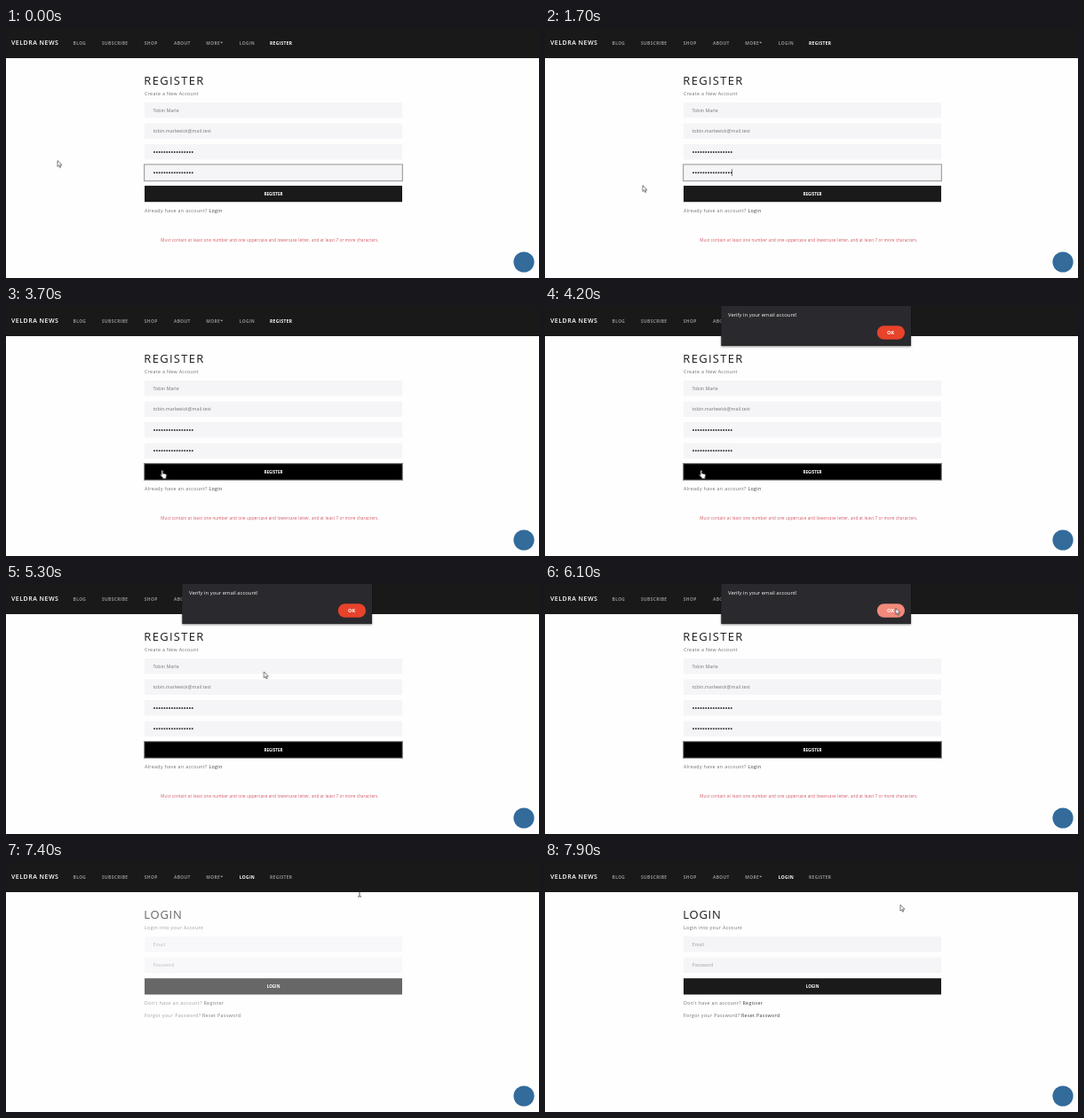
Animation, 600 px wide and 282 px high, one loop 8 s. Source, as an HTML page:

```html
<!DOCTYPE html>
<html lang="en">
<head>
<meta charset="utf-8">
<title>Register and log in</title>
<style>
  html, body { margin: 0; width: 100%; height: 100%; overflow: hidden; background: #fefefe; }
  svg { display: block; width: 100vw; height: 100vh; }
  text { font-family: "Open Sans", "Noto Sans", sans-serif; white-space: pre; }

  .brand { font-size: 7px; font-weight: 600; letter-spacing: .5px; fill: #fff; }
  .nav text { font-size: 4.9px; font-weight: 700; letter-spacing: .34px; fill: #8f8f91; }
  .nav .current { fill: #fff; }
  .title { font-size: 13px; fill: #1b1b1b; }
  .note { font-size: 5.3px; letter-spacing: .34px; fill: #707070; }
  .note tspan { fill: #3a3a3a; }
  .value { font-size: 5.3px; fill: #77777a; }
  .hint { font-size: 5.3px; fill: #a0a0a4; }
  .label { font-size: 4.6px; font-weight: 700; fill: #fff; text-anchor: middle; }
  .error { font-size: 4.4px; letter-spacing: .21px; fill: #d2505c; }
  .field { fill: #f5f5f7; }
  .button { fill: #1a1a1a; }
  .dots { stroke: #333; stroke-width: 2; stroke-linecap: round; stroke-dasharray: 0 2.85; }
  .ring { fill: none; stroke: #a3a3a6; stroke-width: 1.2; }
  .message { font-size: 5.9px; fill: #f4f4f4; }
  .ok { font-size: 5.6px; }

  /* One shared 8 s clock: 1% is 80 ms. */
  [class*="t-"] { animation: 8s step-end infinite; }
  .t-before { animation-name: before; }
  .t-after { animation-name: after; }
  .t-field-focus { animation-name: field-focus; }
  .t-button-focus { animation-name: button-focus; }
  .t-caret { animation-name: caret; }
  .t-dialog { animation-name: dialog; }
  .t-ok { animation-name: ok; }
  .t-login { animation-name: login; animation-timing-function: linear; }
  .t-pointer { animation-name: pointer; }
  .t-arrow { animation-name: arrow; }
  .t-hand { animation-name: hand; }
  .t-beam { animation-name: beam; }

  @keyframes before { 0% { opacity: 1 } 85%, 100% { opacity: 0 } }
  @keyframes after { 0% { opacity: 0 } 85%, 100% { opacity: 1 } }
  @keyframes field-focus { 0% { opacity: 1 } 46.25%, 100% { opacity: 0 } }
  @keyframes button-focus { 0% { opacity: 0 } 46.25%, 100% { opacity: 1 } }
  @keyframes caret {
    0%, 13.75%, 27.5%, 41.25%, 100% { opacity: 0 }
    7.5%, 21.25%, 33.75% { opacity: 1 }
  }
  @keyframes dialog { 0%, 88.75%, 100% { opacity: 0 } 50% { opacity: 1 } }
  @keyframes ok {
    0% { fill: #e8432b }
    70% { fill: #e9604d }
    75% { fill: #f28a7b }
    85%, 100% { fill: #e2523e }
  }
  @keyframes login { 0%, 87.35% { opacity: 0 } 95.1%, 100% { opacity: 1 } }
  @keyframes pointer {
    0% { transform: translate(58px, 149.5px) }
    7.5% { transform: translate(110px, 177.5px) }
    32.5% { transform: translate(110px, 177.5px); animation-timing-function: steps(4) }
    37.5% { transform: translate(160.5px, 181.5px); animation-timing-function: steps(3) }
    41.25% { transform: translate(173.3px, 185px) }
    60% { transform: translate(173.3px, 185px); animation-timing-function: steps(9) }
    71.25% { transform: translate(384px, 30px); animation-timing-function: steps(5) }
    76.25% { transform: translate(394.8px, 27.3px) }
    86.25% { transform: translate(400px, 32.5px) }
    88.75% { transform: translate(398px, 35px) }
    95% { transform: translate(399px, 43px); animation-timing-function: steps(3) }
    98.75%, 100% { transform: translate(400px, 48.2px) }
  }
  @keyframes arrow { 0%, 61.25%, 95%, 100% { opacity: 1 } 37.5%, 86.25% { opacity: 0 } }
  @keyframes hand { 0%, 61.25%, 100% { opacity: 0 } 37.5% { opacity: 1 } }
  @keyframes beam { 0%, 95%, 100% { opacity: 0 } 86.25% { opacity: 1 } }
</style>
</head>
<body>
<svg viewBox="0 0 600 282" preserveAspectRatio="none">
  <defs>
    <rect id="field" class="field" x="156" width="290" height="17.5" rx="1"/>
    <rect id="button" class="button" x="156" width="290" height="18.3"/>
    <path id="dots" class="dots" d="M167 0h43"/>
    <filter id="shadow" x="-10%" y="-20%" width="120%" height="150%">
      <feDropShadow dx="0" dy="1" stdDeviation="1.2" flood-opacity=".45"/>
    </filter>
  </defs>

  <rect width="600" height="282" fill="#fefefe"/>

  <rect width="600" height="34" fill="#19191a"/>
  <text class="brand" x="6" y="19.2">VELDRA NEWS</text>
  <g class="nav">
    <text x="75.5" y="18.8">BLOG</text>
    <text x="108" y="18.8">SUBSCRIBE</text>
    <text x="155.8" y="18.8">SHOP</text>
    <text x="189" y="18.8">ABOUT</text>
    <text x="225.3" y="18.8">MORE</text>
    <path d="M241.3 15.8h3l-1.5 1.6z" fill="#a5a5a7"/>
    <g class="t-before">
      <text x="262.8" y="18.8">LOGIN</text>
      <text class="current" x="297" y="18.8">REGISTER</text>
    </g>
    <g class="t-after">
      <text class="current" x="262.8" y="18.8">LOGIN</text>
      <text x="297" y="18.8">REGISTER</text>
    </g>
  </g>

  <g class="t-before">
    <text class="title" x="155.3" y="64.3" letter-spacing="1.3">REGISTER</text>
    <text class="note" x="156" y="75.9">Create a New Account</text>
    <use href="#field" y="84"/>
    <use href="#field" y="107.5"/>
    <use href="#field" y="131"/>
    <use href="#field" y="154.5"/>
    <text class="value" x="165.5" y="94.8">Tobin Marle</text>
    <text class="value" x="165.5" y="118.2">tobin.marlewick@mail.test</text>
    <use href="#dots" y="140"/>
    <use href="#dots" y="163.3"/>
    <g class="t-field-focus">
      <rect class="ring" x="155.6" y="153.9" width="290.8" height="18.6"/>
      <path class="t-caret" d="M210.5 159v8" stroke="#333" stroke-width=".6"/>
    </g>
    <use href="#button" y="177.9"/>
    <g class="t-button-focus">
      <rect x="155.6" y="177.6" width="290.8" height="18.8" stroke="#8a8a8c" stroke-width="1.2"/>
    </g>
    <text class="label" x="301" y="188.8">REGISTER</text>
    <text class="note" x="156" y="207.9">Already have an account? <tspan>Login</tspan></text>
    <text class="error" x="174.3" y="240.6">Must contain at least one number and one uppercase and lowercase letter, and at least 7 or more characters.</text>
  </g>

  <g class="t-login">
    <text class="title" x="155.3" y="64.3" letter-spacing=".75">LOGIN</text>
    <text class="note" x="156" y="75.9">Login into your Account</text>
    <use href="#field" y="84"/>
    <use href="#field" y="107.5"/>
    <text class="hint" x="165.5" y="94.8">Email</text>
    <text class="hint" x="165.5" y="118.2">Password</text>
    <use href="#button" y="131.2"/>
    <text class="label" x="301" y="142">LOGIN</text>
    <text class="note" x="156" y="161.2">Don't have an account? <tspan>Register</tspan></text>
    <text class="note" x="156" y="175.4">Forgot your Password? <tspan>Reset Password</tspan></text>
  </g>

  <circle cx="583" cy="264" r="11.6" fill="#336b9b"/>

  <g class="t-dialog">
    <rect x="198.3" y="-6" width="213.7" height="51" fill="#292a2d" filter="url(#shadow)"/>
    <text class="message" x="206" y="12">Verify in your email account!</text>
    <rect class="t-ok" x="373.8" y="22.2" width="31.2" height="15.6" rx="7.8"/>
    <text class="label ok" x="389.2" y="32">OK</text>
  </g>

  <g class="t-pointer">
    <path class="t-arrow" d="M0 0v7l1.6-1.4 1.1 2.4 1-.4-1.1-2.4H5z"
          fill="#fff" stroke="#222" stroke-width=".6" stroke-linejoin="round"/>
    <path class="t-hand" d="M1.8 1a.8.8 0 0 1 1.6 0v3l3 .6q1.1.3 1 1.4L6.9 8v1.8H3.1V8.600L.5 6q-.3-.9.5-.9l.8.700z"
          fill="#fff" stroke="#222" stroke-width=".5" stroke-linejoin="round"/>
    <path class="t-beam" d="M-2-4H-.6L0-3.500.6-4H2M0-3.500V3.500M-2 4H-.6L0 3.500.6 4H2"
          fill="none" stroke="#2a2224" stroke-width=".8"/>
  </g>
</svg>
</body>
</html>
```
